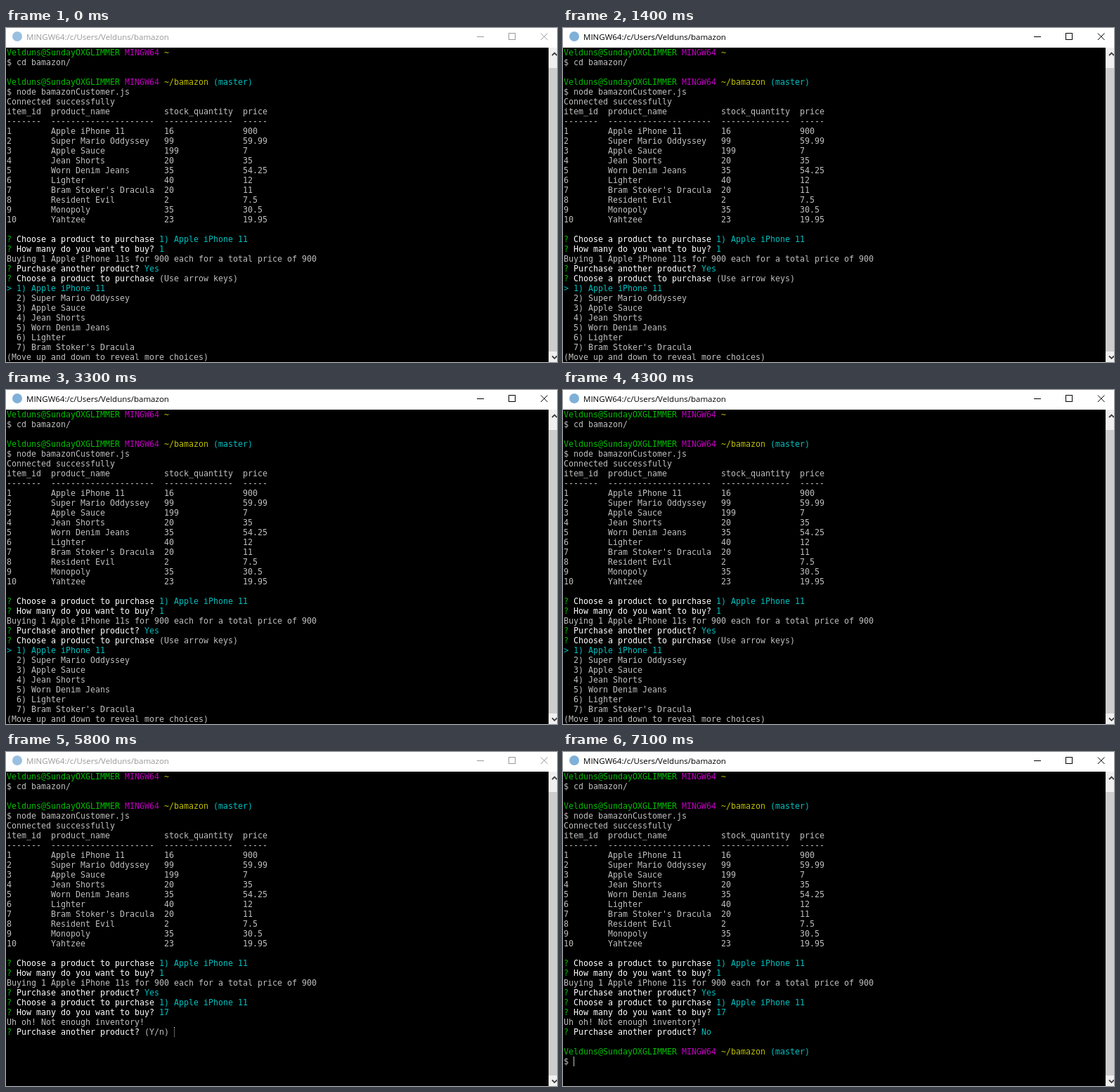
An HTML page for the animation above (7200 ms loop, 784x476 px).

```html
<!DOCTYPE html>
<html lang="en">
<head>
<meta charset="utf-8">
<title>Terminal</title>
<style>
  html, body { margin: 0; width: 100%; height: 100%; overflow: hidden; background: #000; }
  #stage { position: relative; width: 784px; height: 476px; overflow: hidden; background: #000; }
  #bar { position: absolute; inset: 0 0 auto; height: 28px; background: #fff; color: #000; }
  #bar.idle { color: #999; }
  #bar span {
    position: absolute; left: 29px; top: 5px;
    font: 11.5px/16px "Open Sans", "Noto Sans", sans-serif; white-space: pre;
  }
  svg { position: absolute; left: 0; top: 0; }
  #bar svg { fill: none; stroke: currentColor; }
  #icon { fill: #7fb0d8; stroke: none; }
  .idle #icon { opacity: .8; }
  #screen {
    position: absolute; left: 1px; top: 28px; margin: 0; color: #bfbfbf;
    font: 11.63px/14px "DejaVu Sans Mono", "Liberation Mono", monospace;
  }
  #screen div { height: 14px; white-space: pre; }
  .g { color: #00bf00; }
  .m { color: #bf00bf; }
  .y { color: #bfbf00; }
  .c { color: #00bfbf; }
  .w { color: #fff; }
  #cursor { position: absolute; width: 0; height: 14px; border-left: 1px solid #bfbfbf; }
  #cursor.idle { border-left: 1px dotted #bfbfbf; }
</style>
</head>
<body>
<div id="stage">
  <div id="bar">
    <span>MINGW64:/c/Users/Velduns/bamazon</span>
    <svg width="784" height="28">
      <circle id="icon" cx="16" cy="12" r="7"/>
      <path d="M670 12.5h10M715.5 7.5h9v9h-9z" shape-rendering="crispEdges"/>
      <path d="M761 7.5l9.5 9.5M770.5 7.5l-9.5 9.5"/>
    </svg>
  </div>
  <div id="screen"></div>
  <div id="cursor"></div>
  <svg width="784" height="476">
    <path d="M772 28h12v448h-12z" fill="#f0f0f0"/>
    <path d="M772 57h12v404h-12z" fill="#cdcdcd"/>
    <path d="M777 39l3.5-3.5 3.5 3.5M777 467.5l3.5 3.5 3.5-3.5" fill="none" stroke="#404040" stroke-width="1.8"/>
  </svg>
</div>
<script>
const LOOP = 7200;
const TIMES = {
  focus: 800, pick: 4400, one: 4900, seven: 5100,
  refuse: 5800, refocus: 6500, n: 6800, no: 6900, prompt: 7000
};

const items = [
  ["Apple iPhone 11", 16, 900],
  ["Super Mario Oddyssey", 99, 59.99],
  ["Apple Sauce", 199, 7],
  ["Jean Shorts", 20, 35],
  ["Worn Denim Jeans", 35, 54.25],
  ["Lighter", 40, 12],
  ["Bram Stoker's Dracula", 20, 11],
  ["Resident Evil", 2, 7.5],
  ["Monopoly", 35, 30.5],
  ["Yahtzee", 23, 19.95]
];

const $ = id => document.getElementById(id);
const ink = (tone, text) => `<span class="${tone}">${text}</span>`;
const columns = (id, name, stock, price) =>
  String(id).padEnd(9) + name.padEnd(23) + String(stock).padEnd(16) + price;
const shell = (path, branch = "") =>
  `${ink("g", "Velduns@SundayOXGLIMMER")} ${ink("m", "MINGW64")} ${ink("y", path)} ${ink("c", branch)}`;
const ask = (question, answer = "", hint = "") =>
  `${ink("g", "?")} ${ink("w", question)} ${ink("c", answer)}${hint}`;

const CHOOSE = "Choose a product to purchase";
const COUNT = "How many do you want to buy?";
const AGAIN = "Purchase another product?";
const choice = "1) " + items[0][0];
const repo = shell("~/bamazon", "(master)");

const history = [
  shell("~"),
  "$ cd bamazon/",
  "",
  repo,
  "$ node bamazonCustomer.js",
  "Connected successfully",
  columns("item_id", "product_name", "stock_quantity", "price"),
  columns(...[7, 21, 14, 5].map(n => "-".repeat(n))),
  ...items.map((item, i) => columns(i + 1, ...item)),
  "",
  ask(CHOOSE, choice),
  ask(COUNT, "1"),
  "Buying 1 Apple iPhone 11s for 900 each for a total price of 900",
  ask(AGAIN, "Yes")
];

const menu = [
  ask(CHOOSE, "", "(Use arrow keys)"),
  ink("c", "&gt; " + choice),
  ...items.slice(1, 7).map(([name], i) => `  ${i + 2}) ${name}`),
  "(Move up and down to reveal more choices)"
];

// Lines below the history at time t; the cursor sits at the end of the last one.
function session(t) {
  if (t < TIMES.pick) return menu;
  const lines = [ask(CHOOSE, choice)];
  if (t < TIMES.refuse) {
    const typed = t < TIMES.one ? "" : t < TIMES.seven ? "1" : "17";
    return [...lines, ask(COUNT, "", typed)];
  }
  lines.push(ask(COUNT, "17"), "Uh oh! Not enough inventory!");
  if (t < TIMES.no) return [...lines, ask(AGAIN, "", "(Y/n) " + (t < TIMES.n ? "" : "n"))];
  lines.push(ask(AGAIN, "No"), "");
  return t < TIMES.prompt ? lines : [...lines, repo, "$ "];
}

let shown = "";
function draw() {
  const t = performance.now() % LOOP;
  const idle = t < TIMES.focus || (t >= TIMES.refuse && t < TIMES.refocus);
  const lines = [...history, ...session(t)];
  const html = lines.map(line => `<div>${line}</div>`).join("");
  if (html !== shown) {
    $("screen").innerHTML = shown = html;
    const length = $("screen").lastChild.textContent.length;
    $("cursor").style.left = 1 + 7 * length + "px";
    $("cursor").style.top = 28 + 14 * (lines.length - 1) + "px";
    $("cursor").hidden = t < TIMES.pick;
  }
  $("bar").className = $("cursor").className = idle ? "idle" : "";
  requestAnimationFrame(draw);
}
draw();
</script>
</body>
</html>
```
